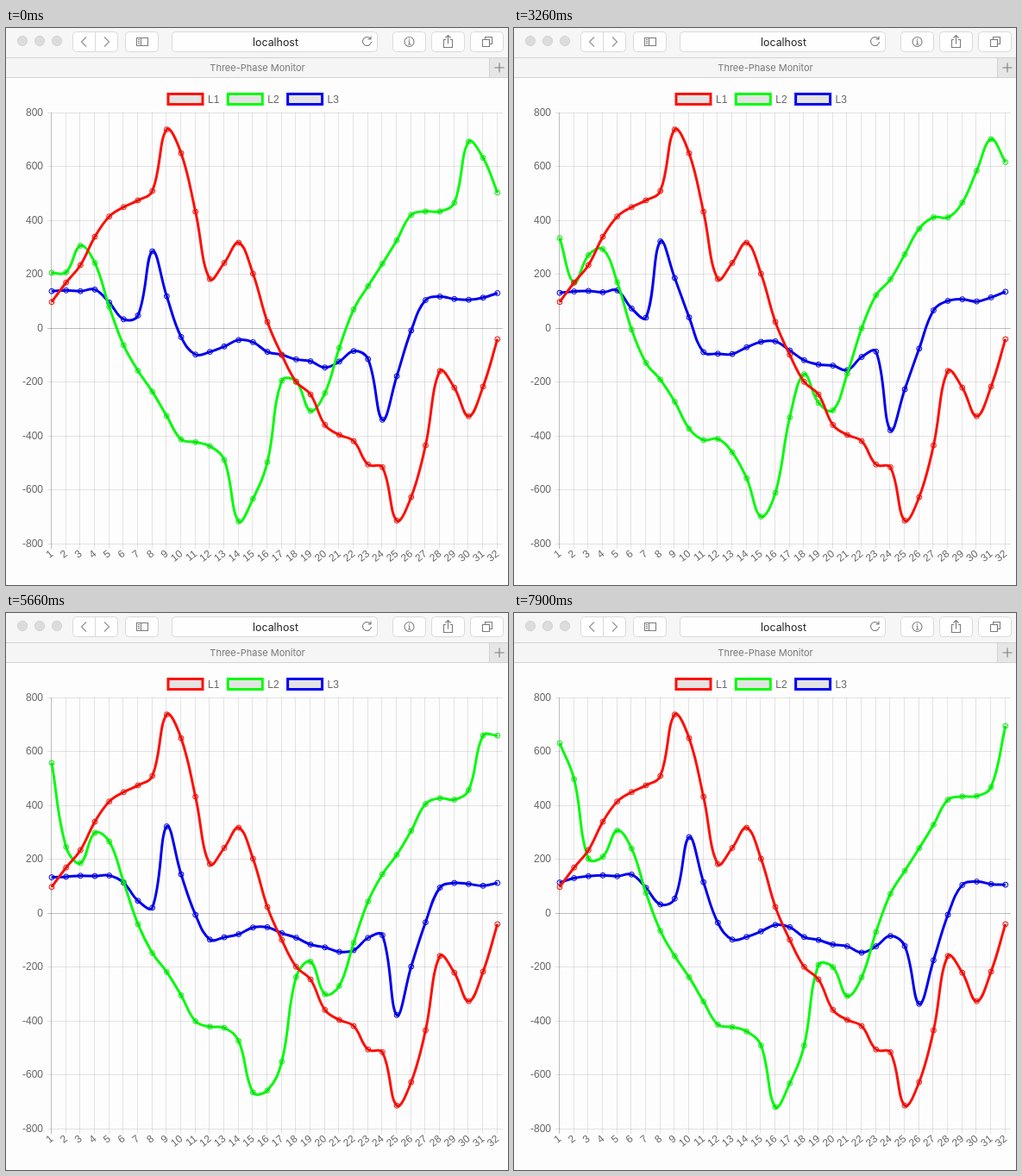
Recreate the animation shown at these times as an HTML page. Size 582 by 646 pixels, loop 8000 ms.

```html
<!DOCTYPE html>
<html lang="en">
<head>
<meta charset="utf-8">
<title>Three-Phase Monitor</title>
<style>
  html, body { margin: 0; width: 100%; height: 100%; overflow: hidden; background: #fdfdfd; }
  svg { display: block; width: 582px; height: 646px; }
  .ui { font-family: Inter, Roboto, sans-serif; text-anchor: middle; }
  .chart text { font: 12px "Liberation Sans", Arial, sans-serif; fill: #666; }
  .btn { fill: #fefefe; stroke: #dadada; }
  .icon { fill: none; stroke: #7c7c7c; stroke-width: 1.1; }
  .line { fill: none; stroke-width: 3; }
  .dots { fill: rgba(0, 0, 0, .1); stroke-width: 1; }
</style>
</head>
<body>
<svg viewBox="0 0 582 646">
  <rect width="582" height="34" fill="#f6f6f6"/>
  <rect y="34" width="582" height="24" fill="#f5f5f5"/>
  <rect x="560" y="35" width="22" height="22" fill="#e6e6e6"/>
  <path d="M0 34.5H582M0 57.5H582M560.5 35V57" stroke="#d2d2d2"/>
  <g fill="#dcdcdc" stroke="#d0d0d0" stroke-width=".8">
    <circle cx="19" cy="15" r="5.7"/><circle cx="39" cy="15" r="5.7"/><circle cx="59" cy="15" r="5.7"/>
  </g>
  <g class="btn">
    <rect x="77.500" y="4.500" width="52" height="23" rx="4"/>
    <rect x="138.500" y="4.500" width="38" height="23" rx="4"/>
    <rect x="192.500" y="4.500" width="238" height="23" rx="4"/>
    <rect x="448.500" y="4.500" width="38" height="23" rx="4"/>
    <rect x="493.500" y="4.500" width="38" height="23" rx="4"/>
    <rect x="538.500" y="4.500" width="38" height="23" rx="4"/>
    <path d="M103.500 5V27"/>
  </g>
  <g class="icon">
    <path d="M93 10.500L87.500 16L93 21.500M114 10.500L119.500 16L114 21.500" stroke="#999" stroke-width="1.300"/>
    <path d="M151.500 11.500H164.500V20.500H151.500ZM156.500 11.500V20.500M153 13.500H155M153 15.500H155M153 17.500H155"/>
    <path d="M422.500 12.500A5 5 0 1 0 423.500 16M423 9.500V13H419.500"/>
    <circle cx="467.500" cy="16" r="5.500"/>
    <path d="M466.500 15H467.700V19M466 19H469.500M467.500 12.300V13.500"/>
    <path d="M510 13.500H507.500V22.500H517.500V13.500H515M512.500 18.500V8.500M509.500 11.500L512.500 8.500L515.500 11.500"/>
    <path d="M555.500 13V10.500H563.500V18.500H561M552.500 13.500H560.500V21.500H552.500Z"/>
    <path d="M566.500 46H577.500M572 40.500V51.500"/>
  </g>
  <g class="ui">
    <text x="312.500" y="20.700" font-size="12.400" fill="#222">localhost</text>
    <text x="291.500" y="50" font-size="11" fill="#777">Three-Phase Monitor</text>
  </g>
  <g class="chart" id="chart"></g>
</svg>
<script>
const N = 32, LOOP = 8000, HALF = 0.6;

const fixed = [98, 170, 235, 340, 415, 450, 475, 510, 738, 650, 433, 183, 243, 318, 203, 24,
  -98, -198, -245, -358, -395, -418, -505, -515, -713, -626, -434, -158, -220, -326, -216, -40];

// Each drifting wave is sampled at phase 0 and at phase HALF.
const green = [
  [206, 208, 307, 243, 80, -62, -157, -235, -325, -412, -422, -437, -488, -716, -632, -496,
    -194, -197, -306, -240, -72, 70, 157, 240, 327, 421, 434, 434, 466, 693, 633, 504],
  [335, 170, 272, 294, 172, -4, -128, -190, -272, -372, -414, -410, -460, -556, -698, -610,
    -330, -170, -276, -304, -168, 0, 123, 182, 275, 370, 412, 412, 467, 585, 702, 617]
];
const blue = [
  [138, 141, 138, 144, 96, 34, 48, 286, 119, -32, -97, -87, -67, -43, -51, -87,
    -98, -115, -122, -145, -123, -84, -114, -339, -177, -8, 105, 118, 109, 106, 114, 131],
  [132, 137, 139, 134, 141, 74, 40, 323, 187, 41, -88, -94, -95, -70, -50, -48,
    -82, -118, -134, -138, -155, -106, -86, -378, -226, -75, 67, 102, 108, 100, 115, 136]
];

const drift = [[0, 0], [860, .12], [2060, .33], [3260, .6], [4910, .94], [6260, 1.46], [7900, 1.98]];

const chart = document.getElementById('chart');
const px = i => 53 + i * 16.67;
const py = v => 348.4 - v * 0.3126;

function add(tag, attrs, text) {
  const el = document.createElementNS('http://www.w3.org/2000/svg', tag);
  for (const k in attrs) el.setAttribute(k, attrs[k]);
  if (text !== undefined) el.textContent = text;
  return chart.appendChild(el);
}

function drawAxes() {
  for (let i = 0; i < N; i++) {
    const x = Math.round(px(i)) - .5;
    add('path', { d: `M${x} 98V604`, stroke: `rgba(0,0,0,${i ? .1 : .25})` });
    add('text', {
      transform: `translate(${px(i)} 608) rotate(-38)`, y: 4, 'text-anchor': 'end'
    }, i + 1);
  }
  for (let v = -800; v <= 800; v += 200) {
    const y = Math.floor(py(v)) + .5;
    add('path', { d: `M48 ${y}H576`, stroke: `rgba(0,0,0,${v ? .1 : .25})` });
    add('text', { x: 43, y: y + 3.8, 'text-anchor': 'end' }, v);
  }
}

function drawLegend(colors) {
  colors.forEach((stroke, i) => {
    const x = 188 + i * 69.3;
    add('rect', { x, y: 76.5, width: 40, height: 12, fill: 'rgba(0,0,0,.1)', stroke, 'stroke-width': 3 });
    add('text', { x: x + 46, y: 87 }, 'L' + (i + 1));
  });
}

function series(stroke) {
  const line = add('path', { class: 'line', stroke });
  const dots = add('path', { class: 'dots', stroke });
  return values => {
    const pts = values.map((v, i) => [px(i), py(v)]);
    line.setAttribute('d', spline(pts));
    dots.setAttribute('d', pts.map(([x, y]) =>
      `M${x - 3} ${y}a3 3 0 1 0 6 0a3 3 0 1 0 -6 0`).join(''));
  };
}

// Cubic spline whose handles are weighted by the distance to each neighbour.
function spline(pts) {
  const handles = pts.map((p, i) => {
    const a = pts[i - 1] || p, b = pts[i + 1] || p;
    const da = Math.hypot(p[0] - a[0], p[1] - a[1]);
    const db = Math.hypot(b[0] - p[0], b[1] - p[1]);
    const at = k => [p[0] + k * (b[0] - a[0]), p[1] + k * (b[1] - a[1])];
    return [at(-.4 * da / (da + db)), at(.4 * db / (da + db))];
  });
  let d = 'M' + pts[0];
  for (let i = 1; i < pts.length; i++) d += `C${handles[i - 1][1]} ${handles[i][0]} ${pts[i]}`;
  return d;
}

function knot(wave, i, n) {
  const turn = Math.floor(n / 2), odd = n - 2 * turn;
  return [turn + odd * HALF, wave[odd][(i - turn + 2 * N) % N]];
}

function sample(wave, i, phase) {
  const turn = Math.floor(phase);
  const n = 2 * turn + (phase - turn >= HALF ? 1 : 0);
  const [a, b, c, d] = [-1, 0, 1, 2].map(k => knot(wave, i, n + k));
  const h = c[0] - b[0], u = (phase - b[0]) / h;
  const m0 = (c[1] - a[1]) / (c[0] - a[0]), m1 = (d[1] - b[1]) / (d[0] - b[0]);
  return b[1] + (c[1] - b[1]) * u * u * (3 - 2 * u)
    + h * (m0 * u * (1 - u) ** 2 + m1 * u * u * (u - 1));
}

function phaseAt(t) {
  let k = 1;
  while (k < drift.length - 1 && t > drift[k][0]) k++;
  const [t0, p0] = drift[k - 1], [t1, p1] = drift[k];
  return p0 + (p1 - p0) * (t - t0) / (t1 - t0);
}

// The graph refreshes in steps of 150 ms.
function hold(t) {
  if (t >= 7900) return 7900;
  const base = t < 860 ? 0 : 860;
  return base + Math.floor((t - base) / 150) * 150;
}

const RED = '#fd1008', GREEN = '#06fa0c', BLUE = '#0000f0';
drawAxes();
drawLegend([RED, GREEN, BLUE]);
const drawBlue = series(BLUE), drawGreen = series(GREEN);
series(RED)(fixed);

let shown = -1;
function render(t) {
  const step = hold(t);
  if (step === shown) return;
  shown = step;
  const phase = phaseAt(step);
  const values = wave => fixed.map((_, i) => sample(wave, i, phase));
  drawBlue(values(blue));
  drawGreen(values(green));
}

const start = performance.now();
function tick() {
  render((performance.now() - start) % LOOP);
  requestAnimationFrame(tick);
}
tick();
</script>
</body>
</html>
```
